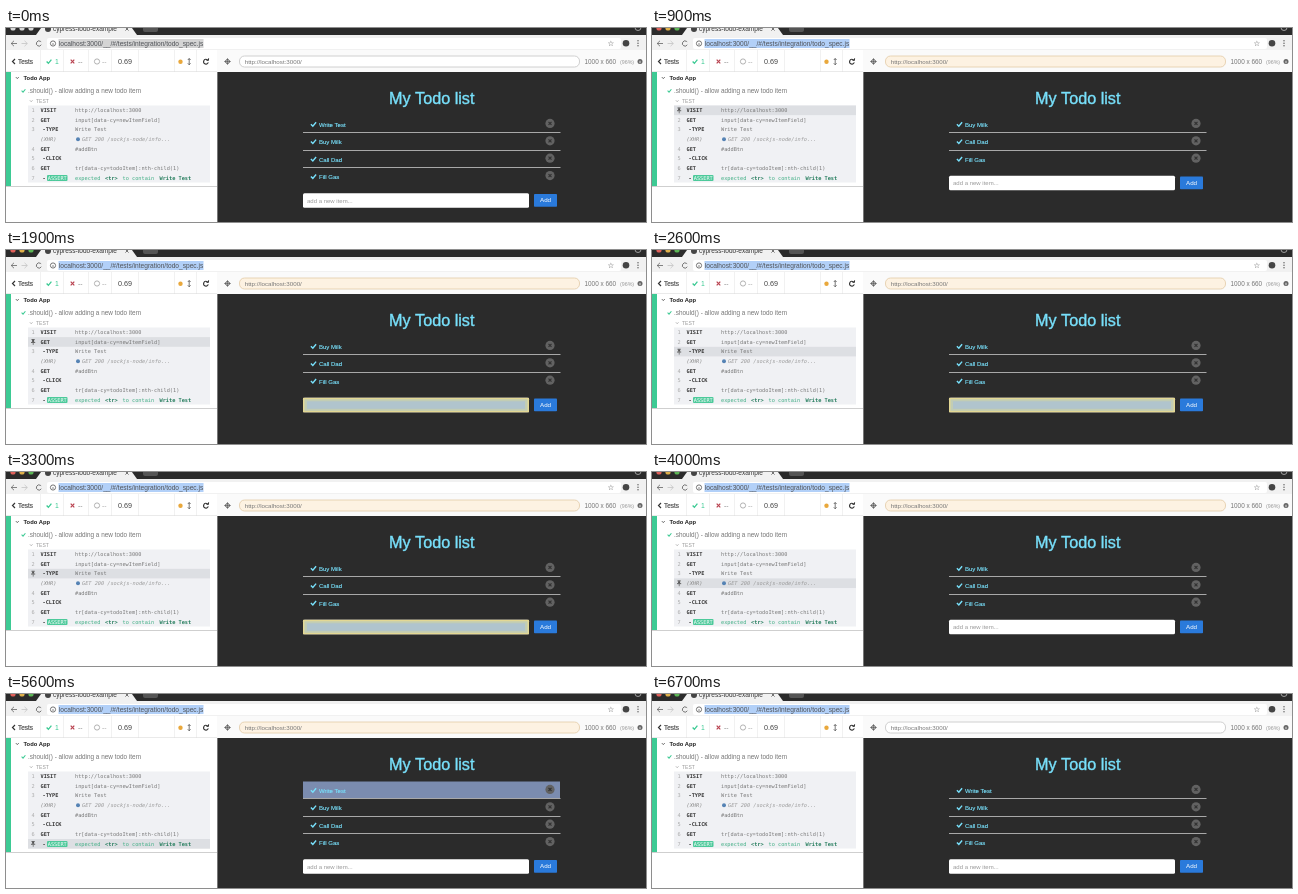
These frames come from a looping animation (640x194 px, 7300 ms). An HTML page with a canvas:

```html
<!DOCTYPE html>
<html lang="en">
<head>
<meta charset="utf-8">
<title>Todo test run</title>
<style>
  html, body { margin: 0; width: 100%; height: 100%; overflow: hidden; background: #fff; }
  canvas { display: block; width: 640px; height: 194px; }
</style>
</head>
<body>
<canvas id="stage" width="640" height="194"></canvas>
<script>
const ctx = document.getElementById('stage').getContext('2d');
const LOOP = 7300;
const SANS = '"Liberation Sans", Arial, sans-serif';
const MONO = '"DejaVu Sans Mono", monospace';
const CYAN = '#78e0fb', GREEN = '#3dca94';

// Each step: start time, hovered command (-1 = none), state of the app.
const steps = [
  { at: 0, row: -1, added: true },
  { at: 500, row: 0 },
  { at: 1800, row: 1, mark: 'input' },
  { at: 2600, row: 2, mark: 'input' },
  { at: 3400, row: 2, mark: 'input', typed: true },
  { at: 3600, row: 3 },
  { at: 4100, row: 4, mark: 'button', typed: true },
  { at: 4600, row: 5, mark: 'button', typed: true },
  { at: 5400, row: 6, mark: 'item', added: true },
  { at: 5500, row: 7, mark: 'item', added: true },
  { at: 6500, row: -1, added: true }
];

const commands = [
  ['1', 'VISIT', 'http://localhost:3000'],
  ['2', 'GET', 'input[data-cy=newItemField]'],
  ['3', '-TYPE', 'Write Test'],
  ['', '(XHR)', 'GET 200 /sockjs-node/info...'],
  ['4', 'GET', '#addBtn'],
  ['5', '-CLICK', ''],
  ['6', 'GET', 'tr[data-cy=todoItem]:nth-child(1)'],
  ['7', '-ASSERT', '']
];

function rect(x, y, w, h, fill) {
  ctx.fillStyle = fill;
  ctx.fillRect(x, y, w, h);
}

function box(x, y, w, h, r, fill, stroke) {
  ctx.beginPath();
  ctx.roundRect(x, y, w, h, r);
  if (fill) { ctx.fillStyle = fill; ctx.fill(); }
  if (stroke) { ctx.strokeStyle = stroke; ctx.lineWidth = 0.8; ctx.stroke(); }
}

function text(str, x, y, size, color, style = '', family = SANS) {
  ctx.font = `${style} ${size}px ${family}`;
  ctx.fillStyle = color;
  ctx.fillText(str, x, y);
}

// Text with a slightly heavier stroke than the regular weight.
function heavyText(str, x, y, size, color, weight) {
  text(str, x, y, size, color);
  ctx.strokeStyle = color;
  ctx.lineWidth = weight;
  ctx.strokeText(str, x, y);
}

function mono(str, x, y, color, style) {
  text(str, x, y, 5.25, color, style, MONO);
}

function dot(x, y, r, fill) {
  ctx.beginPath();
  ctx.arc(x, y, r, 0, 7);
  ctx.fillStyle = fill;
  ctx.fill();
}

function ring(x, y, r, color, from = 0, to = 7, width = 0.9) {
  ctx.beginPath();
  ctx.arc(x, y, r, from, to);
  ctx.strokeStyle = color;
  ctx.lineWidth = width;
  ctx.stroke();
}

function line(points, color, width = 0.8) {
  ctx.beginPath();
  points.forEach(([x, y]) => ctx.lineTo(x, y));
  ctx.strokeStyle = color;
  ctx.lineWidth = width;
  ctx.stroke();
}

function check(x, y, size, color) {
  line([[x - size, y], [x - size * 0.25, y + size * 0.75], [x + size, y - size * 0.75]], color, size * 0.55);
}

function cross(x, y, r, color, width) {
  line([[x - r, y - r], [x + r, y + r]], color, width);
  line([[x + r, y - r], [x - r, y + r]], color, width);
}

function drawBrowser(focused) {
  rect(0, 0, 640, 22, '#f1f1f1');
  rect(0, 0, 640, 7, '#2b2b2b');
  const lights = focused ? ['#e0605a', '#dfb04a', '#5cb656'] : ['#d8d8d8', '#d8d8d8', '#d8d8d8'];
  lights.forEach((c, i) => dot(7 + i * 9, 0, 2.6, c));
  ctx.beginPath();
  ctx.moveTo(30, 7); ctx.lineTo(35, 0); ctx.lineTo(126, 0); ctx.lineTo(131, 7);
  ctx.fillStyle = '#f1f1f1';
  ctx.fill();
  box(137, -3, 15, 7, 2, '#555');
  dot(42, 1, 3, '#444');
  text('cypress-todo-example', 47, 3.4, 6.5, '#333');
  cross(121, 1, 1.6, '#555');
  ring(632, -0.5, 3, '#aaa');

  line([[8, 12.8], [5.2, 15.5], [8, 18.2]], '#666');
  line([[5.2, 15.5], [11, 15.5]], '#666');
  line([[18.5, 12.8], [21.3, 15.5], [18.5, 18.2]], '#c4c4c4');
  line([[15.5, 15.5], [21.3, 15.5]], '#c4c4c4');
  ring(33, 15.5, 2.6, '#666', 0.5, 5.7);
  box(41, 10, 574, 11, 2, '#fff');
  ring(47, 15.5, 2.6, '#666');
  rect(46.6, 15, 0.8, 2, '#666');
  rect(52.5, 11, 145, 9, focused ? '#b2d0f8' : '#d4d4d4');
  text('localhost:3000/__/#/tests/integration/todo_spec.js', 52.8, 17.6, 6.6, '#505358');
  text('☆', 601.5, 18, 7.5, '#444', 'bold', '"DejaVu Sans", sans-serif');
  dot(620, 15.3, 3.3, '#444');
  for (let i = 0; i < 3; i++) dot(632, 12.8 + i * 2.5, 0.7, '#555');
}

function drawToolbar(pinned) {
  rect(0, 22, 211, 22, '#fff');
  line([[9, 31], [6.5, 33.5], [9, 36]], '#333', 1.2);
  heavyText('Tests', 12, 35.8, 6.4, '#444', 0.15);
  [34, 57, 82, 105, 132, 168, 190].forEach(x => rect(x, 22, 0.6, 22, '#e8e8e8'));
  check(43, 33.5, 2.4, GREEN);
  text('1', 49, 36, 6.8, GREEN);
  cross(66.5, 33.5, 1.8, '#b8404e', 1.2);
  text('--', 72, 36, 6.8, '#888');
  ring(91, 33.5, 2.6, '#aaa');
  text('--', 96, 36, 6.8, '#aaa');
  text('0.69', 112, 36, 7.2, '#444');

  dot(174.5, 33.7, 2.2, '#e9a83c');
  line([[181.8, 32], [183.2, 30.5], [184.6, 32]], '#555');
  line([[183.2, 30.5], [183.2, 36.8]], '#555');
  line([[181.8, 35.3], [183.2, 36.8], [184.6, 35.3]], '#555');
  ring(200, 33.7, 2.4, '#333', 0.3, 5.5, 1.1);
  line([[202.6, 30.3], [202.4, 32.5], [200.4, 32.2]], '#333', 1);
  rect(0, 43.4, 211, 0.6, '#ddd');

  rect(211, 22, 429, 22, '#fafafa');
  ring(221.5, 33.5, 2, '#555');
  line([[221.5, 30.2], [221.5, 36.8]], '#555', 0.7);
  line([[218.2, 33.5], [224.8, 33.5]], '#555', 0.7);
  box(233.5, 28, 340, 11, 5, pinned ? '#fdf2e2' : '#fff', pinned ? '#e2cba6' : '#c4c4c4');
  text('http://localhost:3000/', 238.7, 35.5, 6.2, '#777');
  text('1000 x 660', 578.5, 35.7, 6.4, '#777');
  text('(96%)', 614, 35.5, 5.3, '#999');
  dot(634, 33.5, 2.5, '#666');
  rect(633.6, 32.8, 0.8, 2.3, '#fff');
}

function drawPin(y) {
  rect(25.5, y - 2.8, 3.2, 0.9, '#555');
  rect(26.1, y - 2, 2, 2, '#555');
  rect(25, y, 4.2, 0.9, '#555');
  rect(26.8, y + 0.8, 0.7, 2.2, '#555');
}

function drawAssertion(y) {
  const color = '#3fae84';
  mono('-', 36.5, y, '#333', 'bold');
  box(41, y - 4.6, 20.5, 6, 1, '#4cc99a');
  mono('ASSERT', 41.8, y, '#fff');
  mono('expected', 69, y, color);
  mono('<tr>', 99, y, '#257d5d', 'bold');
  mono('to contain', 116.5, y, color);
  mono('Write Test', 153.5, y, '#257d5d', 'bold');
}

function drawLog(hovered) {
  rect(0, 44, 211, 150, '#fff');
  rect(0, 44, 5, 114, GREEN);
  rect(0, 158, 211, 1, '#cfcfcf');
  line([[9.8, 49], [11.3, 50.7], [12.8, 49]], '#555');
  text('Todo App', 17.5, 52, 5.8, '#222', 'bold');
  check(17.5, 62.7, 1.9, GREEN);
  text('.should() - allow adding a new todo item', 22, 64.5, 6.4, '#777');
  line([[23.8, 72.2], [25.2, 73.8], [26.6, 72.2]], '#999', 0.6);
  text('TEST', 30, 75, 5, '#999');

  rect(22, 77.5, 182, 77, '#f0f1f4');
  commands.forEach(([number, name, message], i) => {
    const top = 77.5 + i * 9.64, base = top + 6.6;
    const xhr = name === '(XHR)';
    if (i === hovered) {
      rect(22, top, 182, 9.64, '#dddfe3');
      drawPin(top + 4.8);
    } else {
      mono(number, 25.5, base, '#aaa');
    }
    if (name === '-ASSERT') return drawAssertion(base);
    mono(name, name[0] === '-' ? 36.5 : 34.5, base, xhr ? '#888' : '#333', xhr ? 'italic' : 'bold');
    if (xhr) dot(72, top + 4.8, 2, '#5583b4');
    mono(message, xhr ? 76 : 69, base, xhr ? '#999' : '#777', xhr ? 'italic' : '');
  });
}

function drawItem(label, top, marked) {
  if (marked) rect(297, top, 257, 17, '#7b8caf');
  check(307.5, top + 8.7, 2.6, CYAN);
  heavyText(label, 313, top + 11.2, 6, CYAN, 0.15);
  dot(544, top + 7.9, 4.6, '#626262');
  cross(544, top + 7.9, 1.5, '#333', 1.2);
}

function drawForm(top, mark, typed) {
  box(297, top, 226, 14.5, 1.5, '#fff');
  if (mark === 'input') {
    rect(297, top, 226, 14.5, '#e3d894');
    rect(298.5, top + 1.5, 223, 11.5, '#c2cdb4');
    rect(301, top + 3.5, 218, 7.5, '#b0c4cd');
  }
  if (typed) text('Write Test', 301, top + 9.3, 6, '#444');
  else if (mark !== 'input') text('add a new item...', 301, top + 9.3, 6, '#999');

  if (mark === 'button') {
    rect(524, top + 0.8, 27, 12.9, '#c5b78f');
    rect(528, top + 0.8, 23, 12.9, '#9fb39a');
    rect(533.5, top + 3.5, 12, 7.5, '#78a6c6');
    text('Add', 534, top + 9.2, 6.2, '#9cc0dc');
  } else {
    box(528, top + 0.8, 23, 12.7, 0.8, '#2a7adb');
    text('Add', 534, top + 9.2, 6.2, '#fff');
  }
}

function drawApp({ added, mark, typed }) {
  rect(211, 44, 429, 150, '#2b2b2b');
  rect(211, 44, 1, 150, '#777');
  heavyText('My Todo list', 383, 76, 16.2, CYAN, 0.4);
  const items = ['Buy Milk', 'Call Dad', 'Fill Gas'];
  if (added) items.unshift('Write Test');
  items.forEach((label, i) => {
    const top = 87.5 + i * 17.4;
    drawItem(label, top, mark === 'item' && i === 0);
    if (i < items.length - 1) rect(297, Math.round(top + 16.6), 257.5, 1, '#a8a8a8');
  });
  drawForm(95.6 + items.length * 17.4, mark, typed);
}

function draw(now) {
  const t = now % LOOP;
  const step = steps.findLast(s => s.at <= t);
  drawBrowser(t >= 100);
  drawToolbar(step.row >= 0);
  drawLog(step.row);
  drawApp(step);
  requestAnimationFrame(() => draw(performance.now() - start));
}

const start = performance.now();
draw(0);
</script>
</body>
</html>
```
